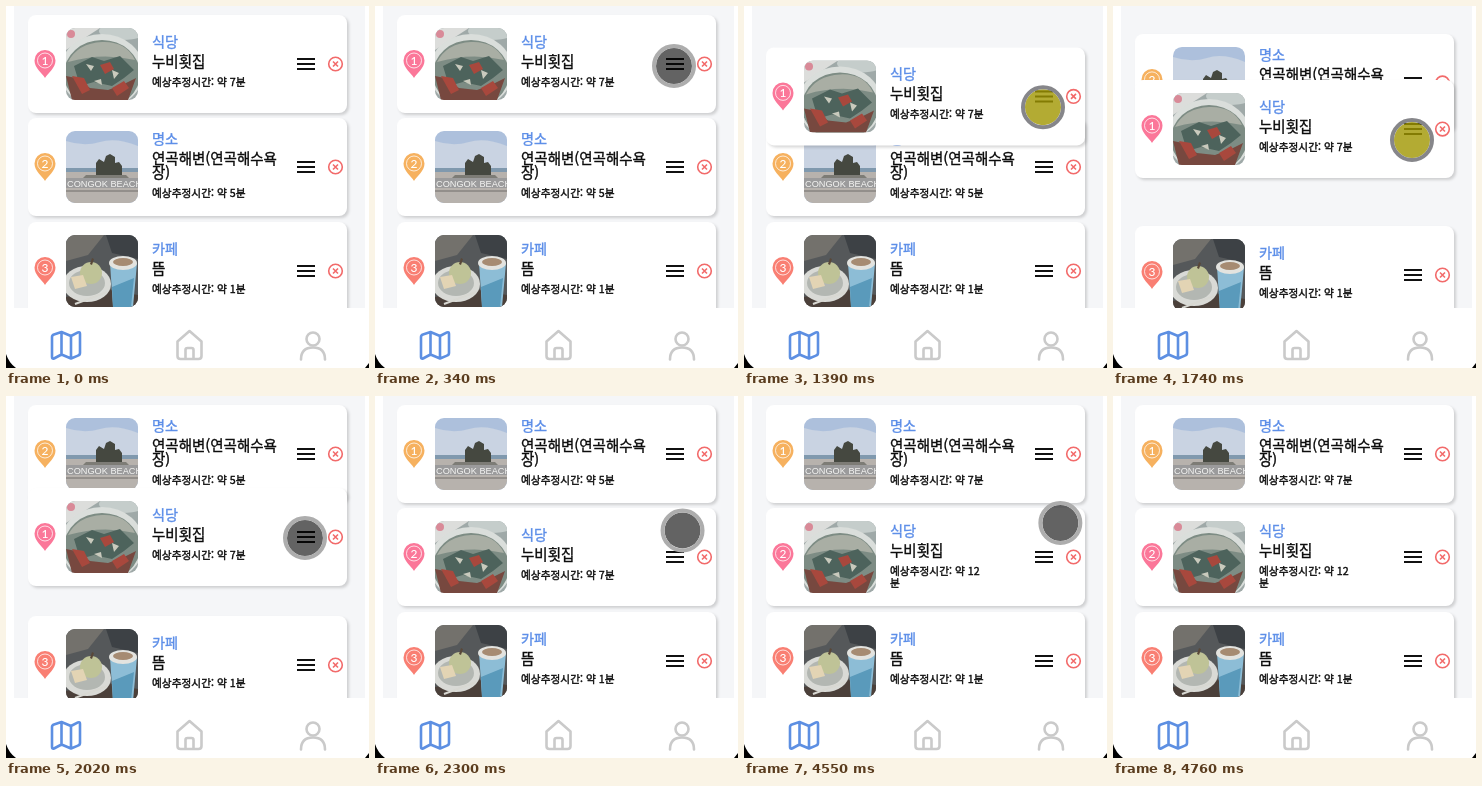
An HTML page for the animation above (5.39 s loop, 363 by 362 pixels).

```html
<!DOCTYPE html>
<html lang="ko">
<head>
<meta charset="utf-8">
<title>Route list</title>
<style>
  html, body { margin: 0; width: 100%; height: 100%; overflow: hidden; background: #fff; }
  body { position: relative; font-family: "Noto Sans CJK KR", "Noto Sans CJK", "Noto Sans", sans-serif; color: #0c0c0c; }
  svg { position: absolute; display: block; }
  #list { position: absolute; left: 8px; top: 0; width: 351px; height: 302px; background: #f5f6f8; overflow: hidden; }
  .card {
    position: absolute; left: 14px; top: 0; width: 319px; height: 98px;
    border-radius: 8px; background: #fff; box-shadow: 2px 2px 3px rgba(0, 0, 0, .16);
  }
  .card > svg { left: 0; top: 0; }
  .card .photo { left: 38px; top: 13px; border-radius: 9px; overflow: hidden; }
  .text { position: absolute; left: 124px; white-space: pre; -webkit-text-stroke: .35px currentColor; }
  .kind { font-size: 14.2px; line-height: 18px; color: #5b8de8; }
  .name { font-size: 14.5px; line-height: 14px; margin-top: 4px; }
  .time { font-size: 10.7px; line-height: 12px; margin-top: 8px; }
  .num { font: 500 12px Lato, sans-serif; text-anchor: middle; fill: #fff; }
  #nav { left: 0; top: 302px; }
  #dot {
    position: absolute; z-index: 2; left: -22px; top: -22px; width: 36px; height: 36px; border-radius: 50%;
    border: 4px solid #adadad; background: rgba(0, 0, 0, .61) padding-box;
  }
  #dot.down { border-color: #86868a; background-color: rgba(160, 150, 0, .8); }
</style>
</head>
<body>
<div id="list"></div>

<svg id="nav" width="363" height="60" fill="none" stroke-width="2.6" stroke-linecap="round" stroke-linejoin="round">
  <rect width="363" height="60" fill="#fff"/>
  <path stroke="#5d8fe2" d="M46 29q0-2 2-2.600l7.500-2.400 9.500 4 7-3.600q2-.8 2 1.400V45q0 2-2 2.600L65 50.500l-9.500-4-7.500 4q-2 .6-2-1.500zM55.500 24v22.500M65 28v22.500"/>
  <path stroke="#cacaca" d="M171.500 33.500L183.500 23l12 10.500V48q0 3-3 3h-18q-3 0-3-3zM179.500 51v-9q0-2 2-2h4q2 0 2 2v9"/>
  <g stroke="#cacaca"><circle cx="307" cy="31" r="6.500"/><path d="M295 51.500q0-12 12-12t12 12"/></g>
  <path fill="#000" d="M0 46Q3 55 10 60H0zM363 55l-4 5h4z"/>
</svg>

<div id="dot"></div>

<script>
const LOOP = 5390;

const photos = {
  soup: `
    <rect width="72" height="72" fill="#9fa9a8"/>
    <path d="M0 0h34L0 22z" fill="#dcdddb"/>
    <circle cx="5" cy="6" r="4" fill="#d98a98"/>
    <ellipse cx="57" cy="3" rx="24" ry="9" fill="#c5cdcb"/>
    <ellipse cx="36" cy="43" rx="42" ry="37" fill="#dadedb"/>
    <ellipse cx="36" cy="46" rx="38" ry="34" fill="#7d8c84"/>
    <path d="M2 34Q12 15 36 14t33 18Q36 24 2 34z" fill="#a9aea4"/>
    <path d="M8 38l18-9 12 4 16-5 14 14-10 8-12 8-18-4-14 4z" fill="#4d635c"/>
    <path d="M0 48l10 2 14 10 18 2 16-6 12-6-8 22H6z" fill="#77483f"/>
    <path d="M6 48l12 2 6 12-8 4zM34 37l10-3 4 7-9 5zM46 60l12-7 5 7-12 8z" fill="#a8483d"/>
    <path d="M20 36l8 2-3 5zM46 42l7 3-5 6zM28 53l7-2 1 6z" fill="#c9cabd"/>`,
  beach: `
    <rect width="72" height="72" fill="#adc0dc"/>
    <path d="M0 10q18 6 34 1t38 4v25H0z" fill="#c9d3e2"/>
    <rect y="37" width="72" height="5" fill="#8099ae"/>
    <rect y="41" width="72" height="31" fill="#b7b2ad"/>
    <path d="M30 45V32l3-4 5 3 2-6 4-2 5 3v6l4-1 3 4v10z" fill="#454840"/>
    <path d="M20 44h40l4 4H16z" fill="#7d7c76"/>
    <path d="M0 47h72v10H0z" fill="#9b9b9c"/>
    <text x="1" y="56" font-family="Liberation Sans, sans-serif" font-size="9.2" fill="#f4f4f2">CONGOK BEACH</text>
    <path d="M0 59h72v2H0z" fill="#938f8b"/>`,
  cafe: `
    <rect width="72" height="72" fill="#55585a"/>
    <path d="M0 0h38L22 20 0 26z" fill="#73716c"/>
    <path d="M40 0h32v24L46 18z" fill="#3d4145"/>
    <path d="M0 62l40-8 32 6v12H0z" fill="#4b403a"/>
    <ellipse cx="21" cy="49" rx="24" ry="18" fill="#d9dad6"/>
    <ellipse cx="21" cy="48" rx="18" ry="13" fill="#b3b7b2"/>
    <circle cx="25" cy="38" r="11" fill="#bfc397"/>
    <path d="M24 29l2-6 2 1-2 6z" fill="#594839"/>
    <path d="M5 42l12-2 4 11-12 3z" fill="#e3d4b4"/>
    <path d="M44 28h27l-4 44H47z" fill="#8dbdd6"/>
    <path d="M46 52l22-9-3 29H47z" fill="#5a9abb"/>
    <ellipse cx="57" cy="28" rx="14" ry="7" fill="#e3e3df"/>
    <ellipse cx="57" cy="27" rx="10" ry="4" fill="#a68b72"/>
    <path d="M9 69l32-12" stroke="#d8d8d2" stroke-width="2"/>`
};

const info = [
  { kind: '식당', name: '누비횟집', pic: 'soup', pin: '#fb7799' },
  { kind: '명소', name: '연곡해변(연곡해수욕\n장)', pic: 'beach', pin: '#f6b15f' },
  { kind: '카페', name: '뜸', pic: 'cafe', pin: '#f97f73' }
];

const list = document.getElementById('list');
const dot = document.getElementById('dot');

const cards = info.map(({ kind, name, pic, pin }) => {
  const el = document.createElement('div');
  el.className = 'card';
  el.innerHTML = `
    <svg width="319" height="98" fill="none">
      <path fill="${pin}" d="M17 63C14 58 6.500 53 6.500 45.500a10.500 10.500 0 0 1 21 0C27.500 53 20 58 17 63z"/>
      <circle cx="17" cy="45.500" r="7.500" stroke="#fff" stroke-opacity=".75"/>
      <text class="num" x="17" y="50"></text>
      <path stroke="#111" stroke-width="2" d="M269 44h18M269 49h18M269 54h18"/>
      <g stroke="#f26a6a" stroke-width="1.600"><circle cx="307.500" cy="49" r="6.800"/><path d="M305 46.500l5 5m0-5l-5 5"/></g>
    </svg>
    <svg class="photo" width="72" height="72">${photos[pic]}</svg>
    <div class="text"><div class="kind">${kind}</div><div class="name">${name}</div><div class="time"></div></div>`;
  list.append(el);
  const find = s => el.querySelector(s);
  return { el, num: find('.num'), text: find('.text'), time: find('.time') };
});
cards[0].el.style.zIndex = 1;

// Linear track through [ms, value] points.
function track(t, points) {
  if (t <= points[0][0]) return points[0][1];
  for (let i = 1; i < points.length; i++) {
    const [b, w] = points[i], [a, v] = points[i - 1];
    if (t <= b) return v + (w - v) * (t - a) / (b - a);
  }
  return points[points.length - 1][1];
}

const dotX = [[70, 322], [340, 299], [2160, 299], [2440, 316], [4550, 316], [4760, 390]];
const dotY = [[70, 98], [340, 60], [1050, 60], [1530, 118], [1740, 134], [1880, 142], [2160, 142], [2440, 127]];
const drag = [[1050, 9], [1120, 9], [1530, 58], [1740, 74], [1880, 82], [2020, 92]];
const rise = [[1530, 112], [1740, 28], [1880, 12], [2020, 9]];
const nudge = [[1530, 216], [1740, 220]];

function setCard(card, y, num, time, top) {
  card.el.style.transform = `translateY(${y}px)`;
  card.num.textContent = num;
  card.time.textContent = `예상추정시간: 약 ${time}`;
  card.text.style.top = top + 'px';
}

function draw(t) {
  const x = track(t, dotX), y = track(t, dotY);
  const swapped = t >= 2160, timed = t >= 2580;

  setCard(cards[0], swapped ? 112 : track(t, drag), swapped ? 2 : 1, timed ? '12\n분' : '7분', timed ? 13 : 17);
  setCard(cards[1], track(t, rise), swapped ? 1 : 2, timed ? '7분' : '5분', 11);
  setCard(cards[2], swapped ? 216 : track(t, nudge), 3, '1분', 17);

  const shown = (t >= 70 && t < 2580) || (t >= 4550 && t < 4760);
  dot.style.visibility = shown ? 'visible' : 'hidden';
  dot.style.transform = `translate(${x}px, ${y}px)`;
  dot.classList.toggle('down', t >= 560 && t < 1880);
}

const start = performance.now();
function tick() {
  draw((performance.now() - start) % LOOP);
  requestAnimationFrame(tick);
}
tick();
</script>
</body>
</html>
```
